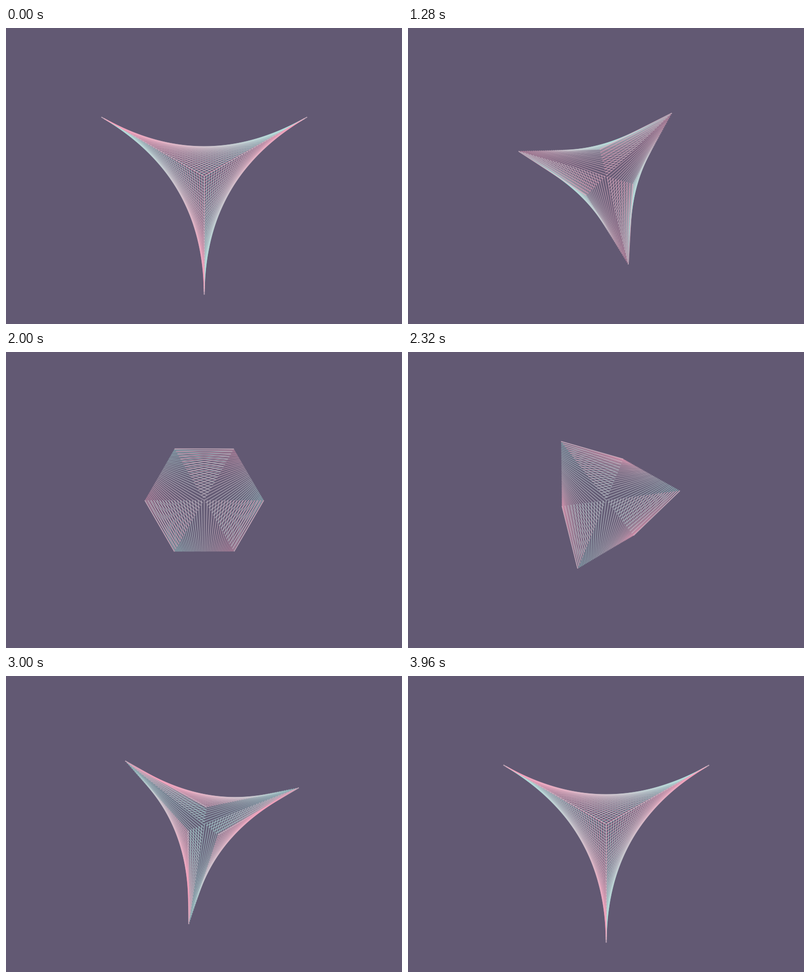
An HTML page with a canvas that plays this animation: 800 by 600 pixels, repeating every 4 s.

```html
<!DOCTYPE html>
<html lang="en">
<head>
<meta charset="utf-8">
<title>String star</title>
<style>
  html, body { margin: 0; width: 100%; height: 100%; overflow: hidden; background: #625973; }
  canvas { display: block; }
</style>
</head>
<body>
<canvas id="stage" width="800" height="600"></canvas>
<script>
const ctx = document.getElementById('stage').getContext('2d');
const LOOP = 4000, ARM = 240, STRINGS = 40, CENTER = 400.5, MIDDLE = 300.5;
const PINK = [250, 160, 188], CYAN = [166, 238, 228];

const mix = (a, b, k) => a + (b - a) * k;
const tint = u => `rgba(${PINK.map((c, i) => Math.round(mix(c, CYAN[i], u)))},0.5)`;

// Sum of two vectors given as length and angle in degrees.
function reach(r1, a1, r2, a2) {
  const d = Math.PI / 180;
  return [
    r1 * Math.cos(a1 * d) + r2 * Math.cos(a2 * d),
    r1 * Math.sin(a1 * d) + r2 * Math.sin(a2 * d)
  ];
}

function draw(time) {
  const e = (1 - Math.cos(Math.PI * (time % LOOP) / LOOP)) / 2;
  const shrinking = ARM * (1 - e), growing = ARM * e;
  ctx.setTransform(1, 0, 0, 1, 0, 0);
  ctx.fillStyle = '#625973';
  ctx.fillRect(0, 0, 800, 600);
  ctx.translate(CENTER, MIDDLE);
  ctx.rotate(-e * Math.PI / 3);
  ctx.lineWidth = 2;

  // Cyan strings first, so the pink ones lie on top.
  for (let i = STRINGS; i >= 0; i--) {
    const u = i / STRINGS, v = 1 - u;
    ctx.strokeStyle = tint(u);
    for (let turn = 0; turn < 360; turn += 120) {
      ctx.beginPath();
      ctx.moveTo(...reach(v * shrinking, turn + 90, u * growing, turn + 150));
      ctx.lineTo(...reach(u * shrinking, turn + 210, v * growing, turn + 30));
      ctx.stroke();
    }
  }
}

const start = performance.now();
function tick() {
  draw(performance.now() - start);
  requestAnimationFrame(tick);
}
tick();
</script>
</body>
</html>
```
